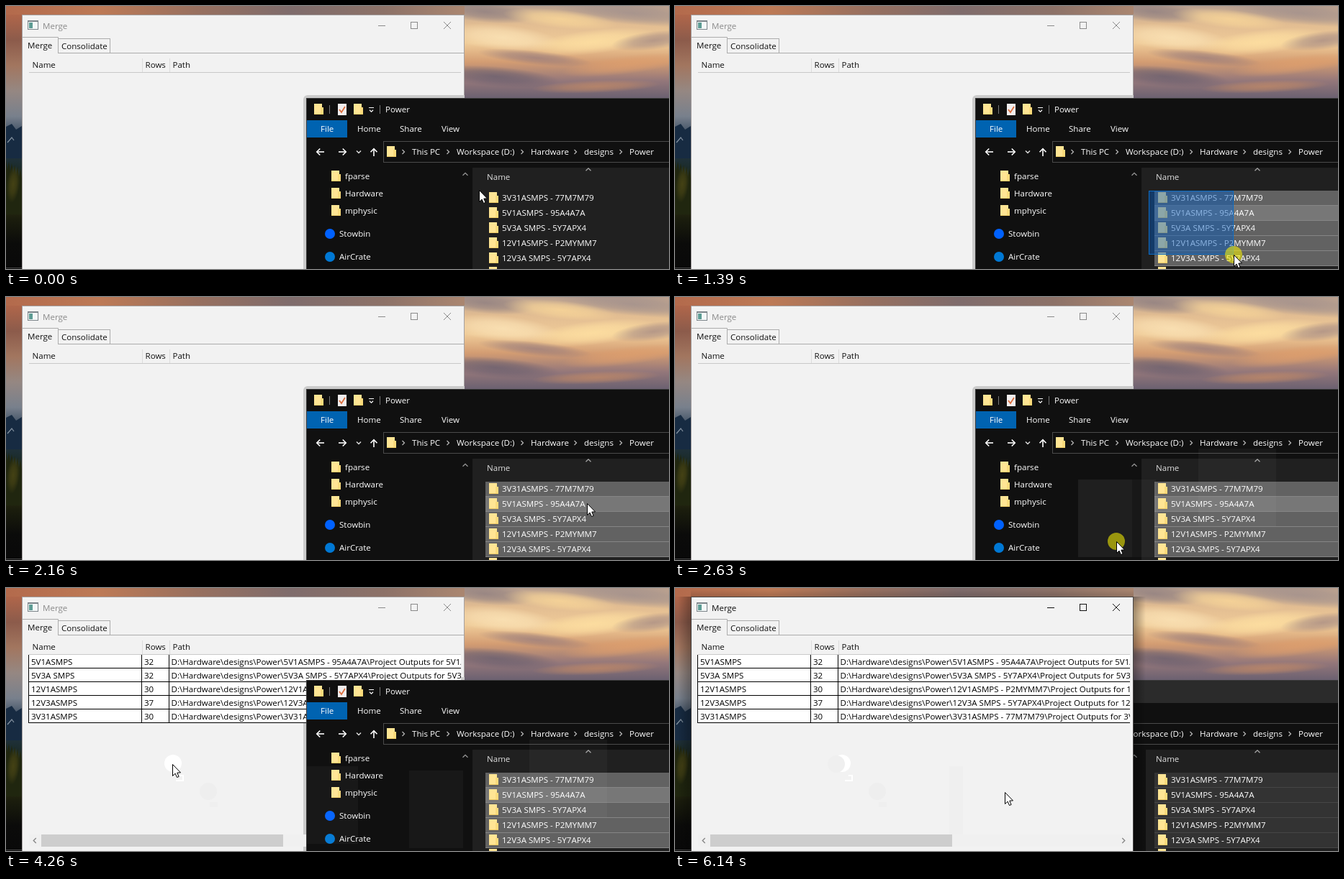
Write an HTML page with a canvas that moves like this. It is 921x366 px and loops after 6.22 s.

```html
<!DOCTYPE html>
<html lang="en">
<head>
<meta charset="utf-8">
<title>Merge</title>
<style>
html, body { margin: 0; width: 100%; height: 100%; overflow: hidden; background: #111; }
canvas { display: block; }
</style>
</head>
<body>
<canvas id="stage" width="921" height="366"></canvas>
<script>
const W = 921, H = 366, LOOP = 6220;
const ctx = document.getElementById('stage').getContext('2d');
const FONT = '11.55px "Open Sans", "Noto Sans", sans-serif';

// Pointer legs: first change, last change, number of changes, end x, end y
const LEGS = [
  [70, 70, 1, 647, 252], [320, 470, 3, 658, 257],
  [700, 1310, 9, 776, 345], [1390, 1390, 1, 776, 346],
  [1770, 2160, 6, 807, 287],
  [2400, 2480, 2, 780, 297], [2550, 2630, 2, 613, 340],
  [2700, 2700, 1, 435, 334], [2780, 2850, 2, 281, 284],
  [2930, 2930, 1, 232, 245], [4260, 4260, 1, 231, 245],
  [4340, 4720, 6, 224, 245],
  [5670, 5670, 1, 236, 247], [5750, 5750, 1, 328, 262],
  [5820, 5820, 1, 438, 282], [5900, 5900, 1, 463, 283],
  [6070, 6140, 2, 458, 284]
];
const FOLDERS = ['3V31ASMPS - 77M7M79', '5V1ASMPS - 95A4A7A', '5V3A SMPS - 5Y7APX4',
  '12V1ASMPS - P2MYMM7', '12V3A SMPS - 5Y7APX4'];
const FILES = [
  ['5V1ASMPS', 32, 1], ['5V3A SMPS', 32, 2], ['12V1ASMPS', 30, 3],
  ['12V3ASMPS', 37, 4], ['3V31ASMPS', 30, 0]
];

const during = (t, a, b) => t >= a && t < b;

function pointerAt(t) {
  let x = 657, y = 256;
  for (const [start, end, steps, toX, toY] of LEGS) {
    if (t < start) break;
    const done = end > start
      ? Math.min(steps, Math.floor((t - start) / (end - start) * (steps - 1) + 0.001) + 1)
      : steps;
    x += (toX - x) * done / steps;
    y += (toY - y) * done / steps;
  }
  return { x: Math.round(x), y: Math.round(y) };
}

function rect(x, y, w, h, color) {
  ctx.fillStyle = color;
  ctx.fillRect(x, y, w, h);
}

function frame(x, y, w, h, color) {
  ctx.strokeStyle = color;
  ctx.lineWidth = 1;
  ctx.strokeRect(x + 0.5, y + 0.5, w - 1, h - 1);
}

function disc(x, y, r, color) {
  ctx.fillStyle = color;
  ctx.beginPath();
  ctx.arc(x, y, r, 0, Math.PI * 2);
  ctx.fill();
}

function line(points, color, width = 1) {
  ctx.strokeStyle = color;
  ctx.lineWidth = width;
  ctx.beginPath();
  points.forEach(([x, y]) => ctx.lineTo(x, y));
  ctx.stroke();
}

// Text is placed by its left edge and the middle of its line.
function text(str, x, middle, color) {
  ctx.font = FONT;
  ctx.fillStyle = color;
  ctx.fillText(str, x, middle + 4);
}

function clipped(x, y, w, h, draw) {
  ctx.save();
  ctx.beginPath();
  ctx.rect(x, y, w, h);
  ctx.clip();
  draw();
  ctx.restore();
}

function gradient(x0, y0, x1, y1, colors) {
  const g = ctx.createLinearGradient(x0, y0, x1, y1);
  colors.forEach((c, i) => g.addColorStop(i / (colors.length - 1), c));
  return g;
}

function cloud(x, y, rx, ry, rgb, alpha, tilt = -0.12) {
  ctx.save();
  ctx.translate(x, y);
  ctx.rotate(tilt);
  ctx.scale(rx, ry);
  const g = ctx.createRadialGradient(0, 0, 0, 0, 0, 1);
  g.addColorStop(0, `rgba(${rgb},${alpha})`);
  g.addColorStop(0.5, `rgba(${rgb},${alpha * 0.7})`);
  g.addColorStop(1, `rgba(${rgb},0)`);
  disc(0, 0, 1, g);
  ctx.restore();
}

function folder(x, y) {
  rect(x, y, 11, 15, '#ffe594');
  rect(x + 9, y + 5, 4, 10, '#fbdb7c');
  rect(x, y + 14, 13, 1, '#f0cb66');
}

function chevron(x, y, dx, dy, color, size = 3, width = 1.2) {
  line([[x - dx * size / 2 - dy * size, y - dy * size / 2 - dx * size],
    [x + dx * size / 2, y + dy * size / 2],
    [x - dx * size / 2 + dy * size, y - dy * size / 2 + dx * size]], color, width);
}

function arrow(x, y, dx, dy) {
  line([[x - dx * 5, y - dy * 5], [x + dx * 5, y + dy * 5]], '#fff', 1.6);
  chevron(x + dx * 3, y + dy * 3, dx, dy, '#fff', 4.5, 1.6);
}

function wallpaper() {
  rect(0, 0, W, 130, gradient(0, 0, W, 0,
    ['#b36a4c', '#bd7a56', '#98705f', '#7f6c6c', '#8d7268', '#b08a72', '#d3b391', '#c9a98f']));
  clipped(637, 0, 284, 130, () => {
    rect(637, 0, 284, 130, gradient(0, 0, 0, 130,
      ['#b9a08f', '#e2bd92', '#efcb98', '#d39c72', '#94777a', '#685f70']));
    cloud(665, 8, 70, 15, '142,126,128', 0.8, 0.1);
    cloud(870, 10, 110, 16, '160,143,140', 0.8, 0.1);
    cloud(770, 18, 80, 13, '249,214,152', 0.85, 0.1);
    cloud(690, 44, 80, 18, '250,225,180', 0.9, 0.1);
    cloud(815, 50, 90, 17, '253,222,160', 0.9);
    cloud(900, 48, 60, 13, '163,136,130', 0.75);
    cloud(735, 72, 80, 10, '146,120,124', 0.7, 0.1);
    cloud(860, 82, 90, 13, '222,158,108', 0.75);
    cloud(680, 98, 90, 14, '102,93,110', 0.75, 0.08);
    cloud(820, 112, 90, 9, '204,142,100', 0.65, -0.04);
  });
  rect(0, 12, 23, H - 12, gradient(0, 12, 0, H,
    ['#b0664a', '#8c5b4b', '#a2765f', '#958782', '#78808c', '#233850', '#1c2c2c', '#3c3f18', '#1b1d0d', '#0b0b0a', '#090909']));
  ctx.fillStyle = '#172b42';
  ctx.beginPath();
  [[0, 168], [8, 164], [14, 172], [22, 167], [22, 212], [0, 212]].forEach(([x, y]) => ctx.lineTo(x, y));
  ctx.fill();
  line([[2, 190], [8, 183], [11, 187]], '#8492a0', 1.2);
  ctx.fillStyle = '#20260f';
  ctx.beginPath();
  ctx.moveTo(0, 290);
  for (let x = 0; x <= 22; x += 2) ctx.lineTo(x, 214 + x * 0.6 + (x % 4 ? 13 : 0));
  ctx.lineTo(22, 290);
  ctx.fill();
  cloud(10, 248, 9, 26, '92,84,24', 0.6, 0.1);
  rect(0, 364, 22, 1, '#454545');
}

function mergeWindow(t, active) {
  if (active) {
    rect(4, 12, 18, H, gradient(4, 0, 22, 0, ['rgba(0,0,0,0)', 'rgba(0,0,0,.3)']));
    rect(636, 12, 18, H, gradient(636, 0, 654, 0, ['rgba(0,0,0,.35)', 'rgba(0,0,0,0)']));
    rect(22, 2, 615, 10, gradient(0, 2, 0, 12, ['rgba(0,0,0,0)', 'rgba(0,0,0,.15)']));
  }
  rect(22, 12, 615, H, '#f2f2f2');
  frame(22, 12, 615, H, active ? '#484646' : '#a5a0a0');

  rect(30, 20, 15, 13, '#7c858a');
  rect(31, 22, 13, 10, '#f4f8f8');
  rect(32, 23, 5, 8, '#5d9c94');
  const ink = active ? '#111' : '#8a8a8a';
  text('Merge', 51, 28, ink);
  line([[517, 27.5], [527, 27.5]], ink);
  frame(562, 22, 10, 10, ink);
  line([[608, 22], [618, 32]], ink);
  line([[618, 22], [608, 32]], ink);

  line([[72, 65.5], [636, 65.5]], '#acacac');
  frame(72, 45, 73, 21, '#acacac');
  line([[23, 43.5], [72.5, 43.5], [72.5, 66]], '#acacac');
  text('Merge', 30, 55, '#111');
  text('Consolidate', 77, 56, '#111');

  text('Name', 36.5, 82, '#111');
  text('Rows', 193.5, 82, '#111');
  text('Path', 231.5, 82, '#111');
  rect(32, 92, 600, 1, '#c9c9c9');
  rect(189, 73, 1, 19, '#dcdcdc');
  rect(227, 73, 1, 19, '#dcdcdc');

  if (!active) {
    ctx.fillStyle = '#cbcbcb';
    ctx.beginPath();
    ctx.roundRect(413, 124, 224, H, [6, 0, 0, 0]);
    ctx.fill();
  }
  if (t >= 3480) table();
  if (t >= 2930) {
    disc(281, 283, 12, '#eeeeee');
    rect(283, 298, 11, 7, '#efefef');
  }
  if (t >= 3480) {
    disc(232, 244, 12, '#fff');
    line([[236, 268], [246, 268], [246, 261], [241, 261]], '#fff', 2);
  }
  if (active) {
    disc(224, 245, 12, '#efefef');
    rect(381, 248, 19, 95, '#efefef');
  }
}

function table() {
  rect(31, 93, 601, 95, '#fff');
  clipped(31, 93, 601, 97, () => FILES.forEach(([name, rows, source], i) => {
    const middle = 103 + i * 19;
    text(name, 35, middle, '#000');
    text(rows, 192, middle, '#000');
    text(`D:\\Hardware\\designs\\Power\\${FOLDERS[source]}\\Project Outputs for ${name}`, 229.5, middle, '#000');
    rect(31, 111 + i * 19, 601, 1, '#000');
  }));
  for (const x of [31, 188, 226]) rect(x, 93, 1, 95, '#000');
  rect(32, 343, 600, 17, '#f0f0f0');
  rect(49, 343, 336, 17, '#cdcdcd');
  chevron(40, 351.5, -1, 0, '#888', 3.5, 1.4);
  chevron(623, 351.5, 1, 0, '#888', 3.5, 1.4);
}

function explorer(t, active, pointer) {
  const banding = during(t, 700, 1770);
  rect(417, 128, 504, H, '#101010');
  if (!active) rect(417, 129, 504, 31, '#2b2b2b');
  rect(417, 128, 504, 1, '#3a3a3a');
  rect(417, 128, 1, H, '#3a3a3a');
  rect(active ? 648 : 654, 225, 273, H, '#202020');

  folder(428, 136);
  line([[449.5, 138], [449.5, 150]], '#777');
  rect(461, 136, 12, 16, '#f1eeee');
  line([[463, 144], [466, 148], [471, 140]], '#dc6d3c', 1.8);
  folder(483, 136);
  rect(504, 141, 7, 1, '#fff');
  chevron(507.5, 146, 0, 1, '#fff', 2.5);
  line([[519.5, 138], [519.5, 150]], '#777');
  text('Power', 527, 144, '#fff');

  rect(418, 159, 56, 24, '#0063b1');
  [['File', 437], ['Home', 488], ['Share', 547], ['View', 605]]
    .forEach(([label, x]) => text(label, x, 171, '#fff'));

  arrow(437, 203, -1, 0);
  arrow(467, 203, 1, 0);
  chevron(490, 203, 0, 1, '#ddd', 3, 1.5);
  arrow(511, 204, 0, -1);
  frame(524, 188, 400, 30, '#4a4a4a');
  folder(529, 195);
  [['This PC', 564], ['Workspace (D:)', 626], ['Hardware', 729], ['designs', 803], ['Power', 866]]
    .forEach(([label, x]) => {
      chevron(x - 12, 203, 1, 0, '#bbb');
      text(label, x, 203, '#fff');
    });

  ['fparse', 'Hardware', 'mphysic'].forEach((label, i) => {
    folder(452, 229 + i * 24);
    text(label, 471, 237 + i * 24, '#fff');
  });
  disc(450, 317, 7, '#0061ff');
  text('Stowbin', 463, 317, '#fff');
  disc(450, 349, 7, '#0078d4');
  text('AirCrate', 463, 349, '#fff');
  chevron(638, 234, 0, -1, '#999', 3.5);
  chevron(809, 227.5, 0, -1, '#aaa', 3.5);
  text('Name', 668, 238, '#dedede');

  FOLDERS.forEach((name, i) => {
    const top = 257 + i * 21;
    if (t >= 1770 || (banding && pointer.y > top + 2)) {
      const fill = !active ? '#333' : i === 1 ? '#777' : '#626262';
      rect(666, top, 255, 21, fill);
      rect(666, top + 20, 255, 1, active ? '#858585' : '#464646');
    }
    folder(671, top + 2);
    text(name, 689, top + 10, '#fff');
  });
  folder(671, 363);

  if (banding) {
    const w = pointer.x - 658, h = pointer.y - 257;
    rect(658, 257, w, h, 'rgba(0,90,190,.45)');
    if (w > 1 && h > 1) frame(658, 257, w, h, '#0c6cc4');
  }
  if (active) dragTrail(t, pointer);
}

function dragTrail(t, pointer) {
  const veil = (x, y, w = 108) => rect(x, y, w, 108, 'rgba(255,255,255,.03)');
  clipped(418, 129, 503, H, () => {
    if (t >= 2480) veil(727, 211);
    if (t >= 2630) veil(560, 254, 75);
    if (t >= 2700) veil(381, 248);
    if (during(t, 2400, 2700)) veil(pointer.x - 53, pointer.y - 86);
  });
}

function drawPointer(t, { x, y }) {
  const pressed = during(t, 700, 1770) || during(t, 2230, 3480) || during(t, 4340, 4640);
  if (pressed) disc(x, y, 12, 'rgba(255,248,0,.55)');
  ctx.save();
  ctx.translate(x + 0.5, y + 0.5);
  ctx.beginPath();
  [[0, 0], [0, 16], [3.6, 12.6], [6, 18], [8.6, 17], [6.3, 11.6], [11, 11.4]]
    .forEach(([px, py]) => ctx.lineTo(px, py));
  ctx.closePath();
  ctx.fillStyle = '#fff';
  ctx.strokeStyle = '#000';
  ctx.lineWidth = 1;
  ctx.fill();
  ctx.stroke();
  if (during(t, 2700, 4260)) {
    ctx.fillRect(3, 16, 10, 7);
    ctx.setLineDash([1.5, 1]);
    ctx.strokeRect(3, 16, 10, 7);
  }
  ctx.restore();
}

function draw(t) {
  const pointer = pointerAt(t);
  const mergeActive = t >= 4340;
  const windows = [() => mergeWindow(t, mergeActive), () => explorer(t, !mergeActive, pointer)];
  if (mergeActive) windows.reverse();
  wallpaper();
  windows.forEach(paint => paint());
  drawPointer(t, pointer);
}

const begin = performance.now();
function tick() {
  draw((performance.now() - begin) % LOOP);
  requestAnimationFrame(tick);
}
tick();
</script>
</body>
</html>
```
